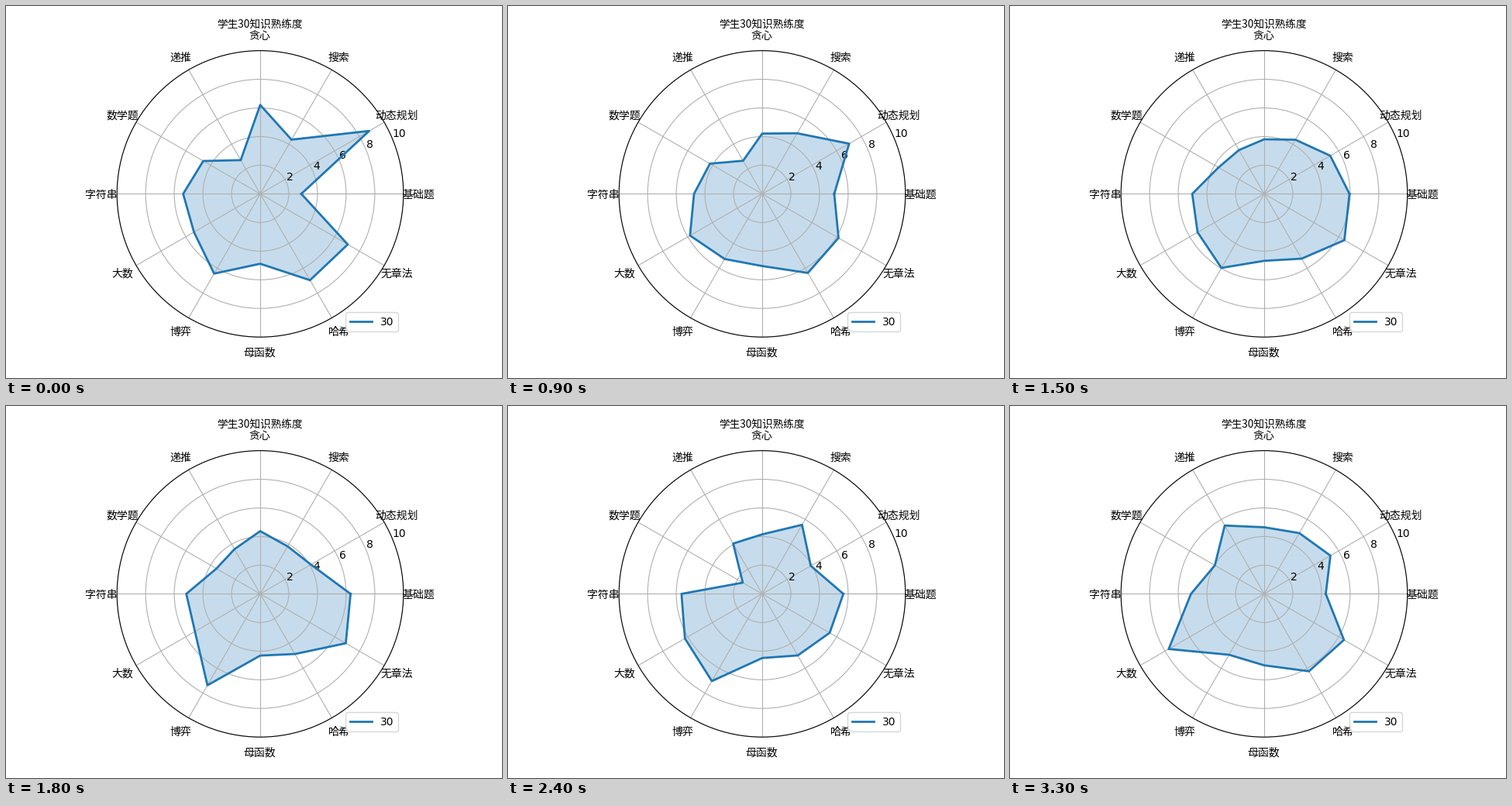
These frames come from a looping animation (640 by 480 pixels, 3600 ms). A matplotlib script:

```python
import numpy as np
import matplotlib.pyplot as plt
from matplotlib.animation import FuncAnimation

STEPS = 12
INTERVAL = 300
BLUE = "#1f77b4"

# Each topic's level moves in straight lines between these steps.
KEY_STEPS = (0, 2, 4, 6, 7, 11)
TOPICS = {
    "基础题": (2.87, 4.46, 5.60, 6.31, 6.12, 4.30),
    "动态规划": (8.79, 7.46, 6.56, 4.09, 3.44, 5.34),
    "搜索": (4.37, 4.87, 4.90, 3.83, 5.79, 4.90),
    "贪心": (6.21, 5.18, 3.24, 4.38, 3.99, 4.65),
    "递推": (2.72, 1.88, 3.46, 3.60, 3.57, 5.51),
    "数学题": (4.59, 4.59, 3.84, 3.53, 0.76, 3.98),
    "字符串": (5.38, 4.63, 4.89, 5.16, 5.81, 5.11),
    "大数": (5.34, 6.16, 5.48, 5.26, 5.74, 7.70),
    "博弈": (6.43, 5.93, 4.57, 7.37, 7.74, 4.91),
    "母函数": (4.88, 5.04, 5.04, 4.31, 4.31, 4.99),
    "哈希": (6.96, 7.15, 5.60, 4.85, 4.54, 6.24),
    "无章法": (7.06, 6.28, 6.03, 6.90, 5.11, 6.43),
}

angles = np.linspace(0, 2 * np.pi, len(TOPICS) + 1)


def levels_at(step):
    levels = [np.interp(step, KEY_STEPS, track) for track in TOPICS.values()]
    return np.array(levels + levels[:1])


def label(text, angle, radius, size=10):
    # The baseline is lowered so that the glyphs sit centred on the point.
    ax.annotate(text, (angle, radius), xytext=(-0.4, -3.8),
                textcoords="offset points", ha="center", va="baseline",
                family="Noto Sans CJK JP", fontsize=size,
                annotation_clip=False, zorder=2.2)


plt.rcParams["font.family"] = "DejaVu Sans"
fig = plt.figure(figsize=(6.4, 4.8), dpi=100)
ax = fig.add_subplot(projection="polar")

for topic, angle in zip(TOPICS, angles):
    label(topic, angle, 11.06)
label("学生30知识熟练度", np.pi / 2, 11.87, 9.85)

start = levels_at(0)
line, = ax.plot(angles, start, color=BLUE, lw=2, label="30")
area, = ax.fill(angles, start, color=BLUE, alpha=0.25, lw=0)
ax.set_thetagrids(np.degrees(angles), [""] * len(angles))
ax.set_rgrids(range(2, 11, 2))
ax.set_ylim(0, 10)
ax.legend(loc="lower right")


def update(step):
    levels = levels_at(step)
    line.set_data(angles, levels)
    area.set_xy(np.column_stack([angles, levels]))
    return line, area


anim = FuncAnimation(fig, update, frames=STEPS, interval=INTERVAL,
                     init_func=lambda: update(0), repeat=True, repeat_delay=0)
plt.show()
```
